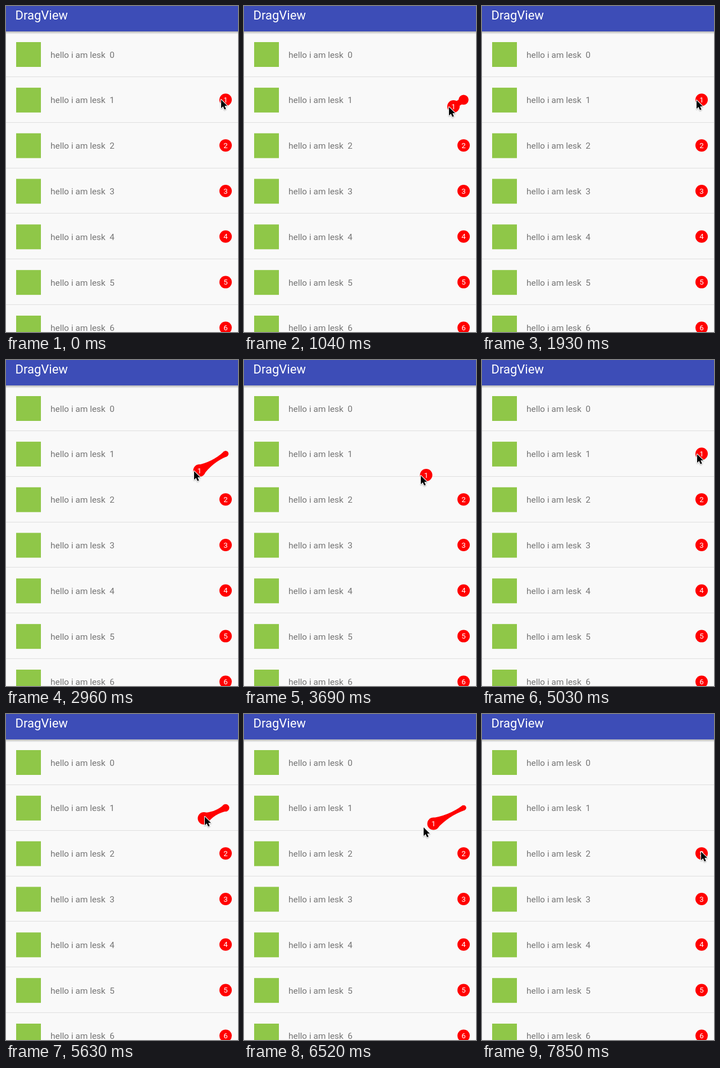
Write an HTML page with a canvas that moves like this. It is 412 px wide and 578 px high and loops after 7990 ms.

```html
<!DOCTYPE html>
<html lang="en">
<head>
<meta charset="utf-8">
<title>DragView</title>
<style>
  html, body { margin: 0; width: 100%; height: 100%; overflow: hidden; background: #f9f9f9; }
  canvas { display: block; }
</style>
</head>
<body>
<canvas id="stage" width="412" height="578"></canvas>
<script>
const ctx = document.getElementById('stage').getContext('2d');
const LOOP = 7990, HOLD = 600, STEP = 148;
const ROW = 80.83, RED = '#ff0000', HOME = { x: 390, y: 166.3 }, RADIUS = 11;

// [step, pointer x, pointer y, badge x, badge y]; the badge is at home when omitted
const path = [
  [-1, 382, 166], [0, 379, 168, 388, 167], [2, 360, 181, 369, 180],
  [3, 364, 179, 372, 178], [5, 382, 167], [9, 381, 167],
  [12, 361, 179, 370, 178], [14, 340, 192, 349, 191], [16, 334, 197, 343.5, 196],
  [19, 317, 204, 327, 203], [21, 311, 206, 320, 205], [23, 314, 205, 322, 204],
  [25, 365, 185, 360, 189], [27, 382, 168], [30, 382, 167],
  [33, 349, 181, 355, 181], [34, 353, 182, 351.5, 185], [36, 374, 171],
  [38, 378, 169, 388, 167], [40, 319, 201, 336.5, 194.5], [42, 290, 227, 300, 225],
  [44, 282, 234, 291, 232], [45, 281, 234], [47, 313, 249], [48, 352, 250], [49, 389, 244]
];

function poseAt(step) {
  const next = Math.max(1, path.findIndex(p => p[0] >= step));
  const a = path[next - 1], b = path[next];
  const u = (step - a[0]) / (b[0] - a[0]);
  const mix = (i, rest) => {
    const from = a[i] ?? rest, to = b[i] ?? rest;
    return from + (to - from) * u;
  };
  return {
    pointer: { x: mix(1), y: mix(2) },
    badge: { x: mix(3, HOME.x), y: mix(4, HOME.y) }
  };
}

function disc(p, r) {
  ctx.fillStyle = RED;
  ctx.beginPath();
  ctx.arc(p.x, p.y, r, 0, Math.PI * 2);
  ctx.fill();
}

function text(string, x, y, size, color, align = 'left') {
  ctx.font = `${size}px Roboto, sans-serif`;
  ctx.fillStyle = color;
  ctx.textAlign = align;
  ctx.fillText(string, x, y);
}

function drawBadge(p, label) {
  disc(p, RADIUS);
  text(label, p.x, p.y + 4.7, 13.3, '#fff', 'center');
}

// Sticky tail whose anchor shrinks as the badge is pulled away
function drawTail(p) {
  const dx = p.x - HOME.x, dy = p.y - HOME.y, d = Math.hypot(dx, dy);
  if (d < 1) return;
  const r = Math.max(4, RADIUS - 0.105 * d);
  const nx = -dy / d, ny = dx / d;
  const mx = (p.x + HOME.x) / 2, my = (p.y + HOME.y) / 2;
  disc(HOME, r);
  ctx.beginPath();
  ctx.moveTo(HOME.x + nx * r, HOME.y + ny * r);
  ctx.quadraticCurveTo(mx, my, p.x + nx * RADIUS, p.y + ny * RADIUS);
  ctx.lineTo(p.x - nx * RADIUS, p.y - ny * RADIUS);
  ctx.quadraticCurveTo(mx, my, HOME.x - nx * r, HOME.y - ny * r);
  ctx.fill();
}

const arrow = new Path2D('M0 0V15.2L3.5 12L6 17.6L8.7 16.4L6.3 11H11Z');

function drawPointer({ x, y }) {
  ctx.save();
  ctx.translate(x, y);
  ctx.lineJoin = 'round';
  ctx.lineWidth = 2;
  ctx.strokeStyle = '#fff';
  ctx.shadowColor = 'rgba(0,0,0,.3)';
  ctx.shadowBlur = 2;
  ctx.shadowOffsetY = 1;
  ctx.stroke(arrow);
  ctx.shadowColor = 'transparent';
  ctx.fillStyle = '#000';
  ctx.fill(arrow);
  ctx.restore();
}

function drawList() {
  ctx.fillStyle = '#f9f9f9';
  ctx.fillRect(0, 0, 412, 578);
  for (let i = 0; i < 7; i++) {
    const y = i * ROW;
    ctx.fillStyle = '#8fc748';
    ctx.fillRect(18, 64 + y, 44, 44);
    text('hello i am lesk', 79, 91.5 + y, 15.4, '#757575');
    text(i, 184, 91.5 + y, 15.4, '#757575');
    ctx.fillStyle = '#dfdfdf';
    ctx.fillRect(0, Math.round(125 + y), 412, 1);
    if (i > 1) drawBadge({ x: HOME.x, y: HOME.y + (i - 1) * ROW }, i);
  }
  const shadow = ctx.createLinearGradient(0, 45, 0, 50);
  shadow.addColorStop(0, 'rgba(0,0,0,.28)');
  shadow.addColorStop(1, 'rgba(0,0,0,0)');
  ctx.fillStyle = shadow;
  ctx.fillRect(0, 45, 412, 5);
  ctx.fillStyle = '#3d4db7';
  ctx.fillRect(0, 0, 412, 45);
  text('DragView', 16.5, 24, 22, '#fff');
}

function draw(t) {
  const step = t < HOLD ? -1 : Math.min(49, Math.floor((t - HOLD + 10) / STEP));
  const { pointer, badge } = poseAt(step);
  const detached = (step >= 20 && step < 27) || step >= 42;
  const springing = step === 34 || step === 35;
  drawList();
  if (!detached) drawTail(badge);
  if (step < 45) drawBadge(badge, springing ? '' : '1');
  drawPointer(pointer);
}

const start = performance.now();
function tick() {
  draw((performance.now() - start) % LOOP);
  requestAnimationFrame(tick);
}
tick();
</script>
</body>
</html>
```
